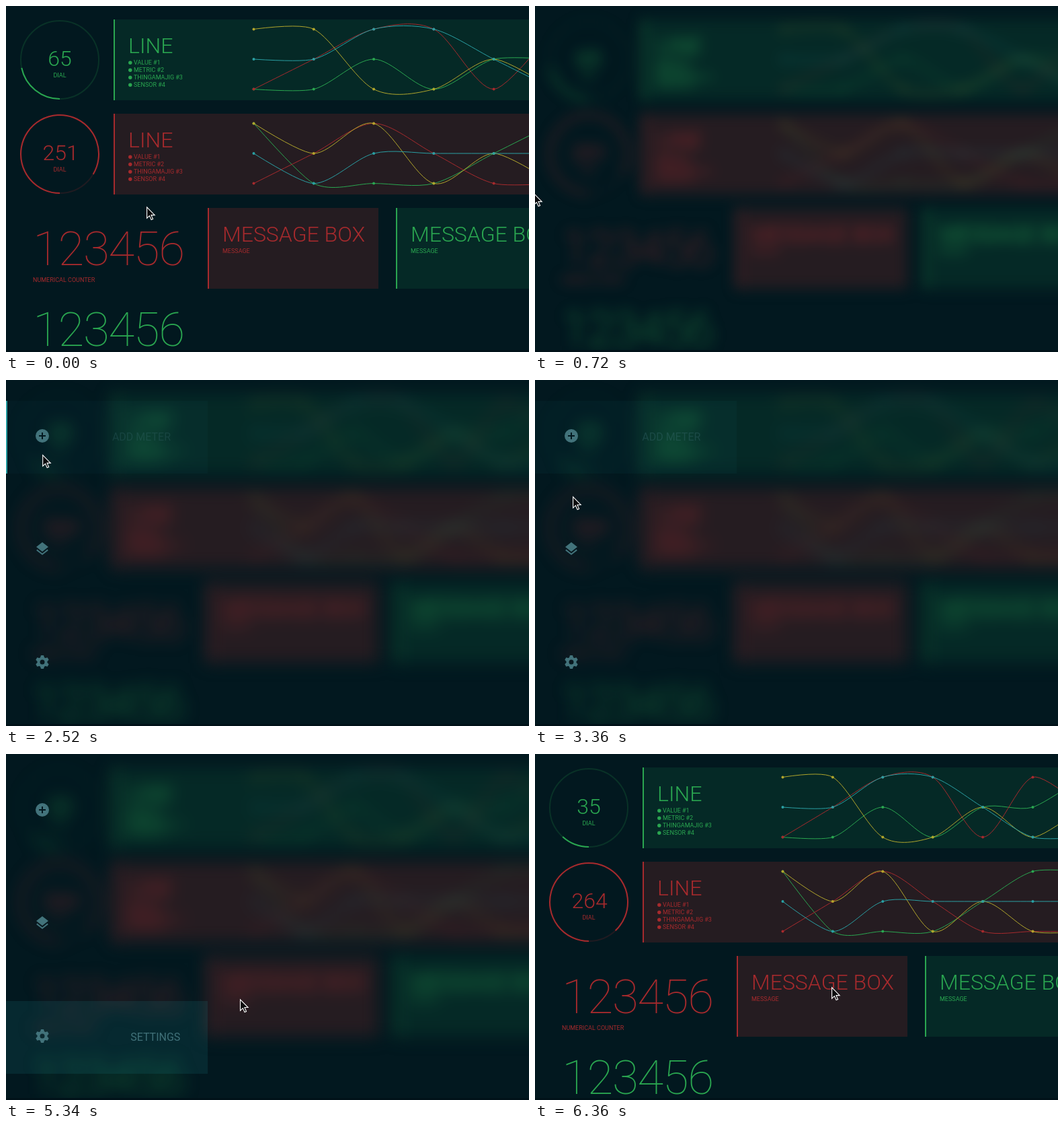
An HTML page that plays this animation: 778x514 px, repeating every 6.66 s.

```html
<!DOCTYPE html>
<html lang="en">
<head>
<meta charset="utf-8">
<title>Dashboard menu</title>
<style>
  html, body { margin: 0; width: 100%; height: 100%; overflow: hidden; background: #02181f; }
  #stage { position: relative; width: 778px; height: 514px; overflow: hidden; background: #02181f; }
  svg { position: absolute; left: 0; top: 0; overflow: visible; }
  text { font-family: Roboto, sans-serif; font-size: 9px; white-space: pre; }
  .title { font-size: 32px; font-weight: 300; }
  .count { font-size: 71px; font-weight: 100; letter-spacing: -.02em; }
  .item text { font-size: 16px; text-anchor: end; }
  .mid { text-anchor: middle; }
</style>
</head>
<body>
<div id="stage">
  <svg id="board" width="860" height="514"></svg>
  <svg id="menu" width="778" height="514"></svg>
  <svg width="778" height="514">
    <rect y="511" width="778" height="3" fill="#011219"/>
    <path id="cursor" d="M.6 .8V17.2L4.4 13.6 7.1 19.6 9.6 18.5 7 12.6H12.2Z"
      fill="#0b0b0d" stroke="#fff" stroke-width="1.1"/>
  </svg>
</div>
<script>
const LOOP = 6660, STEP = 60, DATA_AT = 2100, BLUR = 12;
const GREEN = '#2aa650', RED = '#a62a2d', YELLOW = '#b0a52c', TEAL = '#2a9fa3', ICON = '#42737b';
const FILL = { [GREEN]: '#052926', [RED]: '#251c21' };
const $ = id => document.getElementById(id);

const text = (x, y, s, color, cls = '') =>
  `<text x="${x}" y="${y}" fill="${color}" class="${cls}">${s}</text>`;

// ---- dashboard ----
function dial(cy, value, color) {
  const a = value * 1.2 * Math.PI / 180, r = 58;
  const x = 80 - r * Math.sin(a), y = cy + r * Math.cos(a);
  const mid = 78 + String(value).length;
  return `<g fill="none" stroke="${color}" stroke-width="2">
    <circle cx="80" cy="${cy}" r="${r}" opacity=".18"/>
    <path d="M80 ${cy + r}A${r} ${r} 0 ${+(value > 150)} 1 ${x} ${y}"/></g>` +
    text(mid, cy + 9, value, color, 'title mid') + text(80, cy + 26, 'DIAL', color, 'mid');
}

// Cardinal spline, tension 0.7, with quadratic first and last segments
function curve(pts) {
  const last = pts.length - 1;
  const handle = (i, k) => pts[i].map((v, n) => v + k * (pts[i + 1][n] - pts[i - 1][n]));
  let d = `M${pts[0]}Q${handle(1, -.1)} ${pts[1]}`;
  for (let i = 1; i < last - 1; i++) d += `C${handle(i, .15)} ${handle(i + 1, -.15)} ${pts[i + 1]}`;
  return d + `Q${handle(last - 1, .1)} ${pts[last]}`;
}

function series(levels, count, top, color) {
  const pts = [...levels].slice(0, count)
    .map((v, i) => [368.5 + i * 446.4 / (count - 1), top + 14.4 + v * 44.6]);
  return `<path d="${curve(pts)}" fill="none" stroke="${color}"/>` +
    pts.map(p => `<circle cx="${p[0]}" cy="${p[1]}" r="2" fill="${color}"/>`).join('');
}

const box = (x, y, w, color) =>
  `<rect x="${x}" y="${y}" width="${w}" height="120" fill="${FILL[color]}"/>
   <rect x="${x}" y="${y}" width="2" height="120" fill="${color}"/>`;

function lineRow(top, color, rows, count) {
  const names = ['VALUE #1', 'METRIC #2', 'THINGAMAJIG #3', 'SENSOR #4'];
  return box(160, top, 674, color) + text(182, top + 50, 'LINE', color, 'title') +
    names.map((n, i) => `<circle cx="184.8" cy="${top + 64.2 + i * 11}" r="2.7" fill="${color}"/>` +
      text(190, top + 67 + i * 11, n, color)).join('') +
    [GREEN, RED, YELLOW, TEAL].map((c, i) => series(rows[i], count, top, c)).join('');
}

const message = (x, color) => box(x, 300, 254, color) +
  text(x + 22, 350, 'MESSAGE BOX', color, 'title') + text(x + 22, 367, 'MESSAGE', color);

function board(count, low, high) {
  return dial(80, low, GREEN) + dial(220, high, RED) +
    lineRow(20, GREEN, ['2212110', '2100201', '0022121', '1100122'], count) +
    lineRow(160, RED, ['0222100', '2101222', '0102122', '1211111'], count) +
    message(300, RED) + message(580, GREEN) +
    text(40, 385, '123456', RED, 'count') + text(40, 410, 'NUMERICAL COUNTER', RED) +
    text(40, 505, '123456', GREEN, 'count');
}
const boards = [board(6, 65, 251), board(7, 35, 264)];

// ---- menu ----
const tooth = (_, i) =>
  `<path d="M-3.2 -6L-2 -10H2L3.2 -6Z" transform="rotate(${i * 60})"/>`;
const icons = {
  add: `<circle r="10"/><path d="M-5 0H5M0 -5V5" stroke="#02181f" stroke-width="2"/>`,
  layers: `<path d="M0 -10L9 -3L0 4L-9 -3Z"/>
    <path d="M-8.2 1.4L0 7.8L8.2 1.4" fill="none" stroke="${ICON}" stroke-width="2"/>`,
  gear: `<circle r="5.5" fill="none" stroke="${ICON}" stroke-width="4"/>` +
    Array.from({ length: 6 }, tooth).join('')
};
// hover: spans of time with the pointer over the item
const items = [
  { name: 'ADD METER', icon: icons.add, hover: [[2466, 3240]] },
  { name: 'PAGES', icon: icons.layers, hover: [[1230, 2200], [3440, 3750]] },
  { name: 'SETTINGS', icon: icons.gear, hover: [[3957, 5325]] }
];
$('menu').innerHTML = items.map((m, i) => `<g class="item" transform="translate(0 ${31 + i * 168})">
  <rect width="300" height="108" fill="#26a6b4" fill-opacity=".12"/>
  <rect width="2" height="108" fill="${TEAL}"/>
  <text x="260" y="59" fill="${ICON}">${m.name}</text>
  <g transform="translate(54 52)" fill="${ICON}">${m.icon}</g></g>`).join('');
items.forEach((m, i) => [m.panel, m.bar, m.label] = $('menu').children[i].children);

// ---- motion ----
const clamp = x => Math.min(1, Math.max(0, x));
const smooth = x => x * x * (3 - 2 * x);

// CSS "ease": cubic-bezier(.25, .1, .25, 1)
function ease(x) {
  const bez = (s, a, b) => 3 * s * (1 - s) * (1 - s) * a + 3 * s * s * (1 - s) * b + s * s * s;
  let lo = 0, hi = 1;
  for (let i = 0; i < 24; i++) {
    const s = (lo + hi) / 2;
    if (bez(s, .25, .25) < clamp(x)) lo = s; else hi = s;
  }
  return bez(lo, .1, 1);
}

// rises after a, falls after b
const pulse = (t, a, b, up, down) => ease((Math.min(t, b) - a) / up) * (1 - ease((t - b) / down));

// pointer moves: from, to, x, y
const moves = [
  [0, 720, -2, 278], [720, 960, -16, 277], [1200, 1860, 57, 267], [1920, 2580, 54, 107],
  [2980, 4230, 63, 405], [4800, 5580, 431, 352], [5940, 6360, 441, 346]
];
function pointer(t) {
  let x = 209, y = 298;
  for (const [a, b, px, py] of moves) {
    const k = smooth(clamp((t - a) / (b - a)));
    x += (px - x) * k;
    y += (py - y) * k;
  }
  return [x, y];
}

let shown = -1;
function draw(now) {
  const t = Math.floor(now % LOOP / STEP) * STEP;
  const set = +(t >= DATA_AT);
  if (set !== shown) $('board').innerHTML = boards[shown = set];

  const blur = BLUR * pulse(t, 440, 5340, 500, 500);
  $('board').style.filter = blur > 0.01 ? `blur(${blur}px)` : 'none';
  $('menu').style.opacity = pulse(t, 720, 5340, 240, 400);

  for (const m of items) {
    const p = Math.max(...m.hover.map(([a, b]) => pulse(t, a, b, 300, 300)));
    m.panel.style.opacity = m.label.style.opacity = p;
    m.label.setAttribute('transform', `translate(${-20 * (1 - p)})`);
    m.bar.style.opacity = +m.hover.some(([a, b]) => t >= a && t < b);
  }
  $('cursor').setAttribute('transform', `translate(${pointer(t)})`);
}

const start = performance.now();
function frame() {
  draw(performance.now() - start);
  requestAnimationFrame(frame);
}
frame();
</script>
</body>
</html>
```
